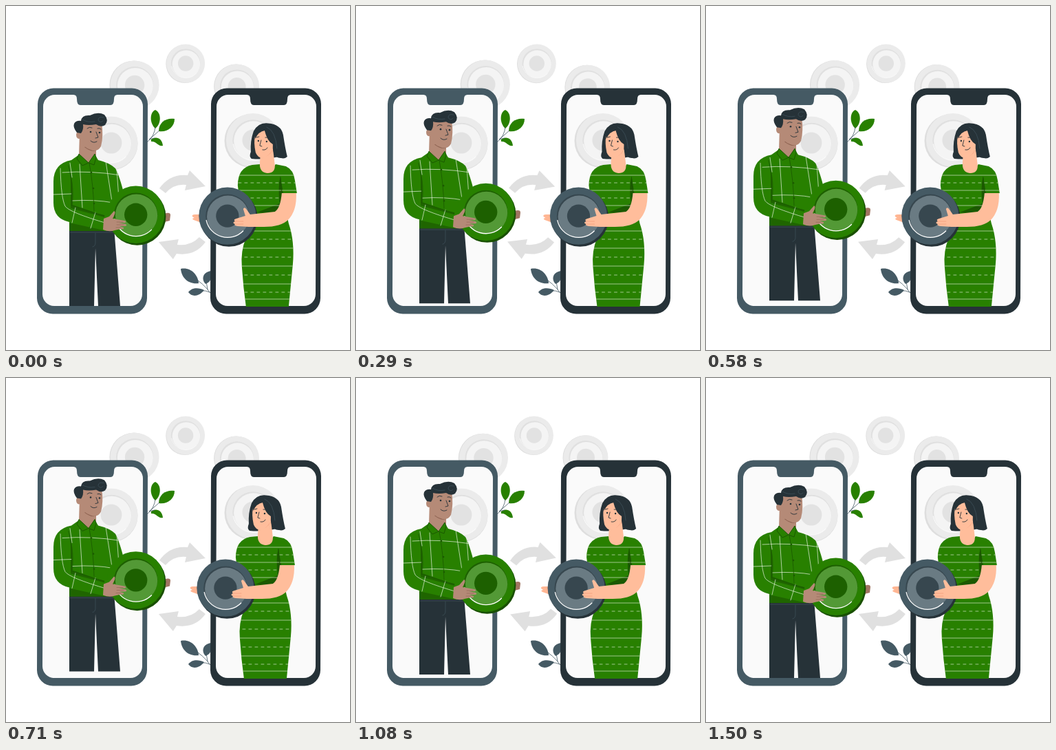
These frames come from a looping animation (500x500 px, 1540 ms). An HTML page:

```html
<!DOCTYPE html>
<html lang="en">
<head>
<meta charset="utf-8">
<title>Coin exchange</title>
<style>
  html, body { margin: 0; height: 100%; overflow: hidden; background: #fff; }
  svg { display: block; width: 100vw; height: 100vh; }
  .line { fill: none; stroke-linecap: round; stroke-linejoin: round; }
</style>
</head>
<body>
<svg viewBox="0 0 500 500">
  <defs>
    <clipPath id="shirtClip"><use href="#shirt"/></clipPath>
    <clipPath id="dressClip"><use href="#dress"/></clipPath>
  </defs>

  <g id="cycle">
    <g id="farCoins"></g>
    <g fill="#e0e0e0">
      <path d="M223 265Q239 243 264 246L267 239L290 262L260 268L262 260Q244 258 232 272Z"/>
      <path d="M290 343Q275 364 248 360L243 368L222 343L251 339L249 347Q269 349 281 336Z"/>
    </g>
  </g>

  <g fill="#288000">
    <path d="M217 178C208 170 209 154 217 151C226 155 226 171 217 178Z"/>
    <path d="M222 182C222 168 234 162 245 164C245 176 234 184 222 182Z"/>
    <path d="M211 194C217 189 227 191 228 203C221 205 219 196 211 197Z"/>
    <path class="line" d="M217 176Q216 189 205 198M223 181L208 194L216 192" stroke="#455a64" stroke-width=".8"/>
  </g>
  <g fill="#455a64">
    <path d="M280 403C265 405 255 395 254 382C268 379 279 390 280 403Z"/>
    <path d="M290 404C284 398 285 387 298 385C300 392 299 401 290 404Z"/>
    <path d="M288 413C280 423 270 423 265 416C270 409 280 409 288 413Z"/>
    <path class="line" d="M270 393Q287 403 297 417M291 400L293 412M272 416Q285 411 296 416" stroke="#455a64" stroke-width=".8"/>
  </g>

  <g id="phones"></g>
  <g id="nearCoins"></g>

  <g id="man">
    <path d="M230 302Q239 299 239 304L238 312L230 314Z" fill="#a17562"/>
    <path d="M92 322H157L166 436H134L130 352L128 436H92Z" fill="#263238"/>
    <path class="line" d="M130 330V344Q130 349 126 350M92 329H157" stroke="#455a64" stroke-width=".6"/>
    <path id="shirt" fill="#288000" d="M105 217Q117 229 129 216L134 224Q151 228 159 236Q165 247 172 275L166 318L157 327H92V314Q69 309 69 286V255Q69 229 95 224Z"/>
    <g clip-path="url(#shirtClip)">
      <path d="M94 245Q99 260 97 289L134 302L143 304V307L94 294ZM92 315L142 326V328H92Z" fill="#1f6500"/>
      <path class="line" stroke="#e9f2e5" stroke-width=".7" d="M82 242Q122 239 167 246M69 274L95 273M97 283Q130 281 156 286M107 230L111 293M145 226L154 284M79 236Q80 279 86 291Q92 300 147 316M93 228L96 249M101 293L96 315M130 300L123 323M161 238L164 280"/>
      <path class="line" d="M91 232Q97 254 95 290L143 305M121 228Q127 260 128 298" stroke="#1b5900" stroke-width=".8"/>
    </g>
    <g fill="#1b5900">
      <circle cx="124" cy="242" r="1.3"/><circle cx="127" cy="265" r="1.3"/><circle cx="128" cy="287" r="1.3"/>
    </g>
    <path d="M107 184H131V217Q124 221 120 229Q111 224 106 217Z" fill="#b58a77"/>
    <path d="M114 205Q124 213 131 210V206L120 203Z" fill="#8c6150"/>
    <path d="M107 172Q122 166 139 170Q142 189 138 204Q133 213 123 209Q111 205 107 193Q102 193 102 187Q103 181 107 184Z" fill="#b58a77"/>
    <path d="M103 184Q97 176 99 171Q102 166 109 167Q110 158 122 159Q134 153 143 158Q150 166 144 173Q138 177 131 172Q120 174 112 172Q113 180 109 185Z" fill="#263238"/>
    <path class="line" d="M142 162Q134 160 134 166Q137 171 141 167M111 165Q119 170 129 168" stroke="#455a64" stroke-width=".6"/>
    <g class="line" stroke="#263238" stroke-width=".9">
      <path d="M118 178Q121 175 125 177M133 178Q136 177 138 179M131 183L134 191L130 192M123 196Q127 200 132 197"/>
    </g>
    <circle cx="123" cy="183" r="1.3" fill="#263238"/><circle cx="136" cy="184" r="1.3" fill="#263238"/>
    <path d="M106 215L120 228L111 232L103 222ZM129 215L120 228L128 231L131 220Z" fill="#288000" stroke="#1b5900"/>
    <g id="greenCoin"></g>
    <path fill="#b58a77" d="M142 309L150 306L157 298Q160 299 157 305L155 309L172 312Q176 313 173 315L164 315L174 317Q177 319 173 320H165L171 322Q172 325 167 324L158 326Q150 329 141 325Z"/>
    <path class="line" d="M161 314H170M161 318H171M160 322H167" stroke="#8c6150" stroke-width=".6"/>
  </g>

  <g id="woman">
    <path d="M284 303H275Q270 303 271 306L274 308Q269 309 273 311L284 315Z" fill="#ffb693"/>
    <path d="M360 182Q367 169 381 170.500Q400 172 403 187Q406 207 409 219Q403 224 397 219Q377 224 357 222Q353 219 356 212Q355 196 360 182Z" fill="#263238"/>
    <path id="dress" fill="#288000" d="M369 230Q380 251 392 230L407 233Q418 238 420 253L423 272H401L411 316Q420 342 417 376L411 437H349Q345 409 343 379Q341 356 349 337L341 290L337 261Q337 235 358 231Z"/>
    <g clip-path="url(#dressClip)">
      <path d="M399 247Q395 263 398 287L365 300L397 303L403 272Z" fill="#1b5900"/>
      <g class="line" stroke="#d3e4ca" stroke-width=".7">
        <path id="stripes"/>
        <path id="dashes" stroke-dasharray="4 5"/>
      </g>
      <path class="line" d="M399 249L401 273" stroke="#1b5900" stroke-width=".8"/>
    </g>
    <path d="M370 213L388 206L391 232Q391 243 380 243Q369 242 369 230Z" fill="#ffbd9b"/>
    <path d="M371 220Q383 219 387 210L370 213Z" fill="#ef9878"/>
    <path d="M362 190Q369 180 378 181Q386 190 390 199Q388 214 377 220Q367 223 363 213Q360 199 362 190Z" fill="#ffbd9b"/>
    <path d="M378 173Q397 174 399 191Q399 207 406 219Q399 223 393 219Q387 213 388 201Q380 197 376 181Q368 182 362 193Q362 177 378 173Z" fill="#263238"/>
    <path class="line" d="M364 191L368 190M377 191Q381 190 384 193M371 195L369 203L372 204M373 209Q378 210 380 206" stroke="#263238" stroke-width=".9"/>
    <circle cx="367" cy="196" r="1.2" fill="#263238"/><circle cx="379" cy="197" r="1.2" fill="#263238"/>
    <path class="line" d="M379 176Q392 181 394 207" stroke="#455a64" stroke-width=".6"/>
    <g id="greyCoin"></g>
    <path fill="#ffbd9b" d="M401 272H422Q423 298 410 311Q400 321 375 321H353L337 320Q331 319 333 317Q328 315 333 313Q330 310 335 309L348 305L345 295Q347 291 350 296L355 303L391 299Q399 294 401 272Z"/>
    <path class="line" d="M333 313L345 313M334 317L345 317" stroke="#ef9878" stroke-width=".7"/>
  </g>
</svg>
<script>
  const $ = id => document.getElementById(id);
  const circle = (x, y, r, fill) => `<circle cx="${x}" cy="${y}" r="${r}" fill="${fill}"/>`;

  // A coin with its rim shifted sideways for thickness and a plain disc as emblem.
  function coin(x, y, r, [edge, face, ring, inner, shine, mark], dx, dy) {
    const q = r * .76, a = q * .97;
    return circle(x + dx, y + dy, r, edge) + circle(x, y, r, face) +
      circle(x, y, q, ring) + circle(x + .8, y + 1, q - 1, inner) +
      `<path class="line" stroke="${shine}" stroke-width="${r / 32}"
        d="M${x - a} ${y + q * .2}A${q} ${q} 0 0 0 ${x + q * .72} ${y + q * .69}"/>` +
      circle(x, y, r * .4, mark);
  }

  const pale = ['#dedede', '#ebebeb', '#e0e0e0', '#f4f4f4', '#fafafa', '#e2e2e2'];
  const green = ['#195000', '#288000', '#1d6000', '#539936', '#fff', '#1d6000'];
  const grey = ['#263238', '#455a64', '#37474f', '#6a7b83', '#fff', '#37474f'];

  $('farCoins').innerHTML = coin(187, 115, 35.5, pale, -1.2, 0) +
    coin(261, 83.5, 28, pale, -.8, .6) + coin(335.5, 117, 32.5, pale, -1, 0);
  $('nearCoins').innerHTML = coin(153, 199, 38.5, pale, 0, 1) + coin(359, 195, 39, pale, -2.5, 1);
  $('greenCoin').innerHTML = coin(188.7, 303.3, 41.7, green, 2, 2.7);
  $('greyCoin').innerHTML = coin(322, 305.2, 41.6, grey, 2.2, 3);

  const phone = (x, color) => `<g transform="translate(${x})">
    <path fill="${color}" d="M25 119.500H139A23 23 0 0 1 162 142.500L161 424.500A23 23 0 0 1 138 447.500H24A23 23 0 0 1 1 424.500L2 142.500A23 23 0 0 1 25 119.500Z"/>
    <path fill="#fafafa" d="M27 129H54Q59 129 59 135Q59 144 64 144H108Q113 144 113 135Q113 129 118 129H138A17 17 0 0 1 155 146L154 419A17 17 0 0 1 137 436H26A17 17 0 0 1 9 419L10 146A17 17 0 0 1 27 129Z"/></g>`;
  $('phones').innerHTML = phone(44, '#455a64') + phone(296, '#263238');

  const rows = ys => ys.map(y => `M338 ${y}H426`).join('');
  $('stripes').setAttribute('d', rows([246, 268, 290, 327, 352, 378, 404, 426]));
  $('dashes').setAttribute('d', rows([257, 279, 339, 365, 391, 416]));

  const LOOP = 1540, PERIOD = 1500, LEAD = 22;
  const FLOAT = [0, -10, 0];
  const SHAKE = [0, -1, 2, -4, 4, -4, 4, -4, 2, -1, 0];
  const SWAY = [0, 1, 0, -1, 0];

  // Linear interpolation through evenly spaced keys.
  function track(keys, p) {
    const s = p * (keys.length - 1), i = Math.floor(s);
    return keys[i] + (keys[i + 1] - keys[i]) * (s - i);
  }

  function draw() {
    const p = (performance.now() % LOOP + LEAD) / PERIOD % 1;
    $('man').setAttribute('transform', `translate(0 ${track(FLOAT, p) + .3})`);
    $('woman').setAttribute('transform', `translate(${track(SHAKE, p)} 0)`);
    $('cycle').setAttribute('transform', `rotate(${track(SWAY, p)} 257 208)`);
    requestAnimationFrame(draw);
  }
  draw();
</script>
</body>
</html>
```
